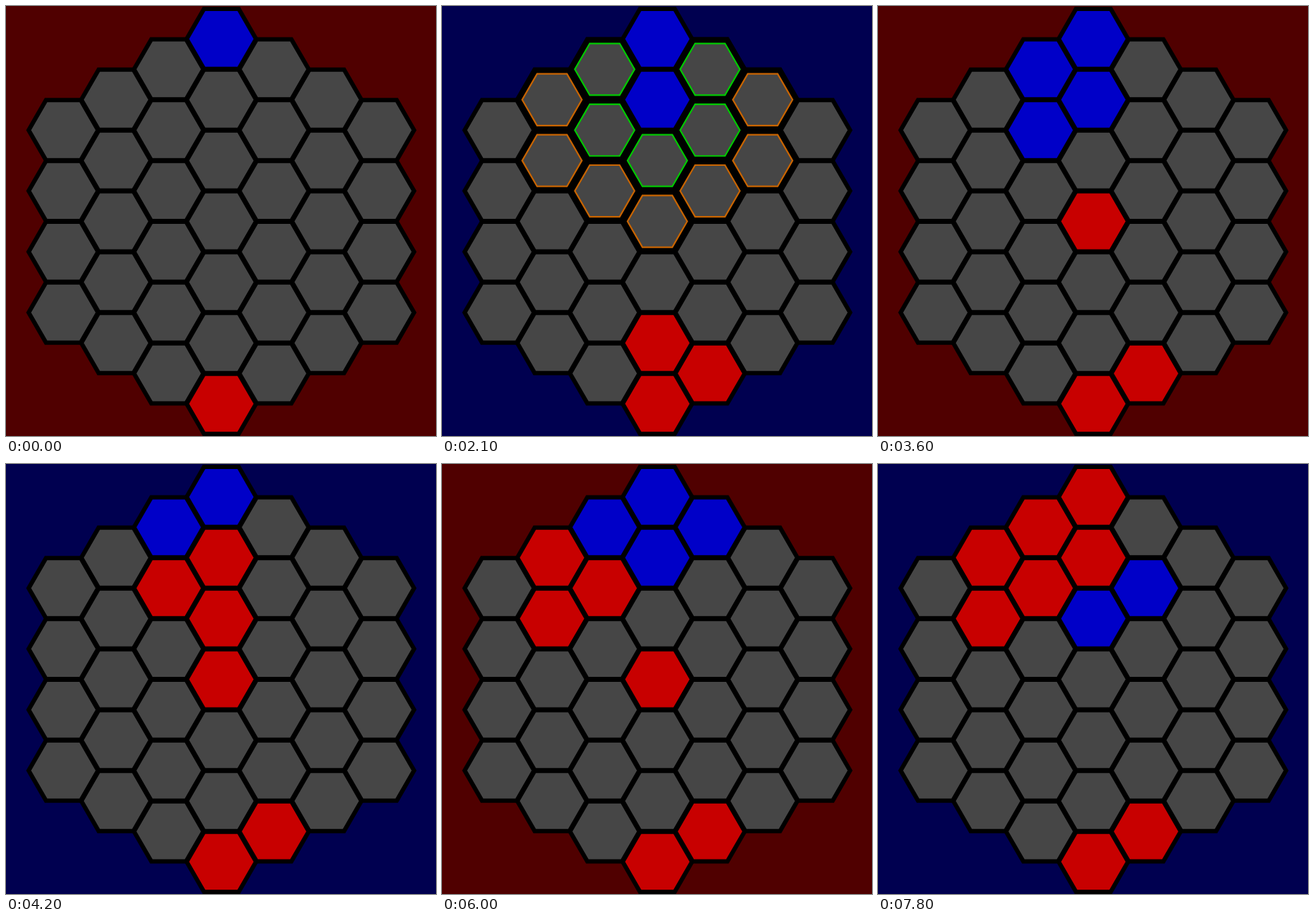
Animation of 600 by 600 pixels, one loop 8 s. Source, as an HTML page with a canvas:

```html
<!DOCTYPE html>
<html lang="en">
<head>
<meta charset="utf-8">
<title>Hex board game</title>
<style>
  html, body { margin: 0; width: 100%; height: 100%; overflow: hidden; background: #500000; }
  canvas { display: block; width: 600px; height: 600px; }
</style>
</head>
<body>
<canvas id="board" width="600" height="600"></canvas>
<script>
const ctx = document.getElementById('board').getContext('2d');
const LOOP = 8000, STEP = 300;
// Cells are spaced slightly wider than they are tall.
const MID = 300.5, ROW = 84.86, COL = ROW * Math.sqrt(3) / 2;
const SIDE = (ROW - 1) / Math.sqrt(3);
const FILL = { red: '#c80000', blue: '#0000c8' };
const BACK = { red: '#500000', blue: '#000050' };
const EMPTY = '#464646', CLONE = '#00c800', JUMP = '#c86400';

// Moves as [from q, from r, to q, to r]; red starts, players alternate.
const MOVES = [
  [0, 3, 1, 2], [0, -3, 0, -2],
  [0, 3, 0, 2], [0, -3, -1, -2],
  [0, 2, 0, 0], [0, -2, -1, -1],
  [0, 0, 0, -1], [-1, -2, -2, -1],
  [0, -1, -2, 0], [0, -3, 1, -3],
  [0, 0, 1, -2], [-1, -2, 0, -1],
  [1, -3, -1, -2]
];

const cells = [];
for (let q = -3; q <= 3; q++)
  for (let r = -3; r <= 3; r++)
    if (Math.abs(q + r) <= 3) cells.push({ q, r });

const dist = (a, b) => {
  const q = a.q - b.q, r = a.r - b.r;
  return Math.max(Math.abs(q), Math.abs(r), Math.abs(q + r));
};
const indexOf = (q, r) => cells.findIndex(c => c.q === q && c.r === r);
const playerAt = turn => turn % 2 ? 'blue' : 'red';

// A nearby move duplicates the piece, a far one relocates it; neighbours are captured.
function play(owners, [q0, r0, q1, r1], player) {
  const next = owners.slice();
  const from = indexOf(q0, r0), to = indexOf(q1, r1);
  if (dist(cells[from], cells[to]) === 2) next[from] = null;
  next[to] = player;
  cells.forEach((c, i) => {
    if (next[i] && dist(c, cells[to]) === 1) next[i] = player;
  });
  return next;
}

const start = cells.map(() => null);
start[indexOf(0, -3)] = 'blue';
start[indexOf(0, 3)] = 'red';
const states = [start];
MOVES.forEach((m, i) => states.push(play(states[i], m, playerAt(i))));

function hex({ q, r }, radius, fill, line, width) {
  const x = MID + q * COL, y = MID + (r + q / 2) * ROW;
  ctx.beginPath();
  for (let k = 0; k < 6; k++) {
    const a = k * Math.PI / 3;
    ctx.lineTo(x + radius * Math.cos(a), y + radius * Math.sin(a));
  }
  ctx.closePath();
  ctx.fillStyle = fill;
  ctx.fill();
  ctx.strokeStyle = line;
  ctx.lineWidth = width;
  ctx.stroke();
}

function reach(owners, player, cell) {
  return Math.min(...cells.map((c, i) => owners[i] === player ? dist(c, cell) : 9));
}

function draw(step) {
  const turn = step >> 1, hints = step % 2 === 1;
  const owners = states[turn], player = playerAt(turn);
  ctx.fillStyle = BACK[player];
  ctx.fillRect(0, 0, 600, 600);
  cells.forEach((c, i) => hex(c, SIDE, FILL[owners[i]] || EMPTY, '#000', 6));
  if (!hints) return;
  cells.forEach((c, i) => {
    const d = owners[i] ? 0 : reach(owners, player, c);
    if (d !== 1 && d !== 2) return;
    hex(c, SIDE, '#000', '#000', 6);
    hex(c, SIDE * 0.86, EMPTY, d === 1 ? CLONE : JUMP, 2.2);
  });
}

let shown = -1;
const t0 = performance.now();
function tick() {
  const step = Math.floor((performance.now() - t0) % LOOP / STEP);
  if (step !== shown) draw(shown = step);
  requestAnimationFrame(tick);
}
tick();
</script>
</body>
</html>
```
